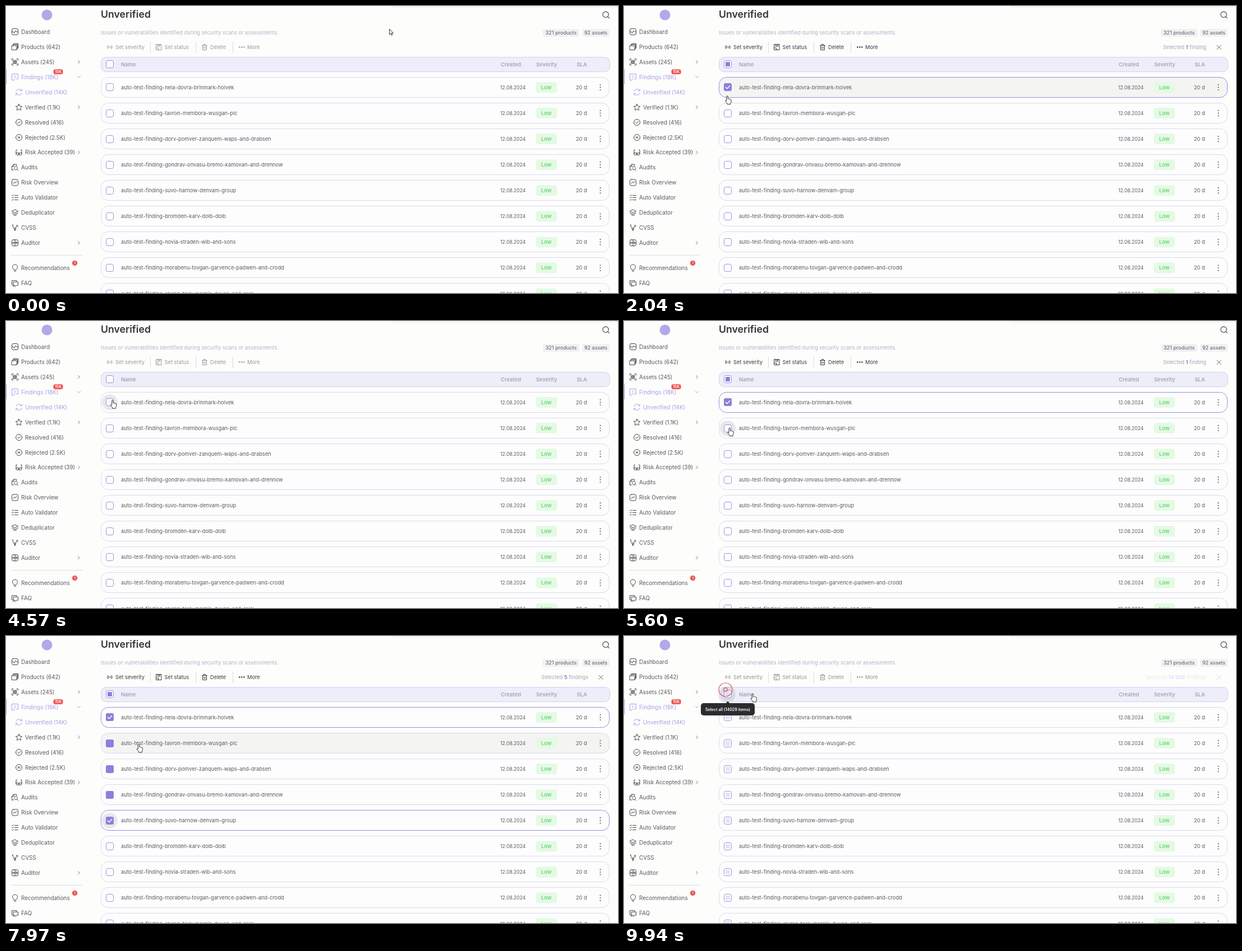
Recreate the animation shown at these times as an HTML page. Size 1091 by 513 pixels, loop 9.98 s.

```html
<!DOCTYPE html>
<html lang="en">
<head>
<meta charset="utf-8">
<title>Unverified findings</title>
<style>
  html, body { margin: 0; width: 100%; height: 100%; overflow: hidden; background: #fdfdfc; }
  svg { display: block; width: 100vw; height: 100vh; font-family: Inter, "Open Sans", sans-serif; }
  text { white-space: pre; }
</style>
</head>
<body>
<svg id="stage" viewBox="0 0 1091 513"></svg>
<script>
const LOOP = 9980;
const INK = '#5a5a62', VIOLET = '#8b80dc', SOFT = '#aa9ee9', EDGE = '#dad8f2', PICKED = '#998fe0';
const stage = document.getElementById('stage');

function el(tag, attrs, parent = stage) {
  const node = document.createElementNS('http://www.w3.org/2000/svg', tag);
  set(node, attrs);
  parent.appendChild(node);
  return node;
}
function set(node, attrs) {
  for (const k in attrs) node.setAttribute(k, attrs[k]);
}
function label(x, y, str, size, fill, weight = 400, parent = stage, anchor = 'start') {
  const node = el('text', { x, y, fill, 'font-size': size, 'font-weight': weight, 'text-anchor': anchor }, parent);
  node.textContent = str;
  return node;
}
function box(x, y, width, height, rx, attrs, parent = stage) {
  return el('rect', { x, y, width, height, rx, ...attrs }, parent);
}
function stroke(x, y, d, color, width = 1, parent = stage) {
  return el('path', {
    d, transform: `translate(${x} ${y})`, fill: 'none', stroke: color,
    'stroke-width': width, 'stroke-linecap': 'round', 'stroke-linejoin': 'round'
  }, parent);
}
const ring = r => `M${-r} 0a${r} ${r} 0 1 1 ${2 * r} 0a${r} ${r} 0 1 1 ${-2 * r} 0`;

// icons, centred on 0,0
const ROUND_BOX = 'M-3-5.5H3Q5.5-5.5 5.5-3V3Q5.5 5.5 3 5.5H-3Q-5.5 5.5-5.5 3V-3Q-5.5-5.5-3-5.5Z';
const ICON = {
  dash: ROUND_BOX + 'M-5.5 0H-3L-1.5 2.5L1-2L2.5 0H5.5',
  products: 'M-5.5-2H3V5.5H-5.5ZM-4-2V-4H4.5V4H3M-2.5-4V-5.5H5.8V2H4.5',
  assets: 'M-5.5-3V-5.5H-3M3-5.5H5.5V-3M5.5 3V5.5H3M-3 5.5H-5.5V3M-3-2.8H-.6V-.5H-3ZM1-2.8H3V-.5H1ZM-3 1H-.6V3H-3ZM1 1H3V3H1Z',
  findings: 'M-2 5.5H-5.5V-5.5H5.5V3.5H2.5M0-2.5V1M0 3V3.2M-2 5.5L-.5 4',
  refresh: 'M-5.2-1.5A5.4 5.4 0 0 1 4.6-2.8M5.2-5.3V-2.4H2.2M5.2 1.5A5.4 5.4 0 0 1-4.6 2.8M-5.2 5.3V2.4H-2.2',
  star: 'M0-5.7L1.7-2L5.7-1.5L2.8 1.3L3.5 5.3L0 3.4L-3.5 5.3L-2.8 1.3L-5.7-1.5L-1.7-2Z',
  ok: ring(5.5) + 'M-2.4 .2L-.7 2L2.6-1.7',
  no: ring(5.5) + 'M-1.8-1.8L1.8 1.8M1.8-1.8L-1.8 1.8',
  glasses: 'M-5 2V-4.5H-3.5M5 2V-4.5H3.5M-5 1H-.7V4.5H-4Q-5 4.5-5 3ZM.7 1H5V3Q5 4.5 4 4.5H.7ZM-.7 2H.7',
  audits: 'M-5.5 4.5V-2.5L-2-5.5H2.5V-3M-5.5-2H-2V-5.5M-5.5 4.5H-2.5M1.8 4.2A3 3 0 1 1 4.2 2.5A3 3 0 0 1 1.8 4.2M4 4L5.6 5.6',
  chart: ROUND_BOX + 'M-3 2L-.8-1L.8 .8L3-2.3',
  checks: 'M-5.5-4L-4.3-3L-2.5-5M-.5-4H5.5M-5.5 0L-4.3 1L-2.5-1M-.5 0H5.5M-5.5 4L-4.3 5L-2.5 3M-.5 4H5.5',
  layers: 'M0-5.5L5.5-2.6L0 .3L-5.5-2.6ZM-5.5 .3L0 3L5.5 .3M-3 3.6L0 5.3L3 3.6',
  cvss: 'M-4.3-4L0 5L2.2-1M-4.8-5H-3M3.8-4.6A1.3 1.3 0 1 0 3.8-2A1.3 1.3 0 0 0 3.8-4.6M0 5L0-1',
  auditor: ROUND_BOX + 'M0-5.5V5.5M-3-1.5L-1.5 0L-3 1.5M1.5-2.5L3.5-1L1.5 .5L3.5 2.5M-5.5 0H5.5',
  bulb: 'M-2 3V2Q-4.5 .5-4.5-2A4.5 4.5 0 0 1 4.5-2Q4.5 .5 2 2V3ZM-1.5 5.6H1.5',
  faq: 'M-3 2.5H-5.5V-5H3V-3.5M-2.5-2.5H5.5V3.5H2.5L1 5.5L-.5 3.5H-2.5ZM-4 5H-1'
};

// static page
const shade = el('linearGradient', { id: 'shade', x1: 0, y1: 0, x2: 0, y2: 1 }, el('defs', {}));
el('stop', { offset: 0, 'stop-color': '#f3f3ef' }, shade);
el('stop', { offset: 1, 'stop-color': '#fdfdfc' }, shade);
box(688, 0, 403, 5, 0, { fill: 'url(#shade)' });
el('circle', { cx: 73, cy: 16, r: 9.5, fill: '#b3a8ea' });

const menu = [
  ['dash', 'Dashboard', 46], ['products', 'Products (642)', 73], ['assets', 'Assets (245)', 100, 0, 1],
  ['findings', 'Findings (18K)', 127, 0, 2], ['refresh', 'Unverified (14K)', 154, 1],
  ['star', 'Verified (1.1K)', 181, 1, 1], ['ok', 'Resolved (416)', 208, 1], ['no', 'Rejected (2.5K)', 235, 1],
  ['glasses', 'Risk Accepted (39)', 261.7, 1, 1], ['audits', 'Audits', 288.5], ['chart', 'Risk Overview', 315.5],
  ['checks', 'Auto Validator', 342.5], ['layers', 'Deduplicator', 369.5], ['cvss', 'CVSS', 396.5],
  ['auditor', 'Auditor', 423.3, 0, 1], ['bulb', 'Recommendations', 468.6], ['faq', 'FAQ', 495.7]
];
menu.forEach(([icon, name, y, sub = 0, arrow = 0]) => {
  const on = icon === 'findings' || icon === 'refresh';
  stroke(16 + sub * 7, y, ICON[icon], on ? SOFT : '#45454c');
  label(27 + sub * 7, y + 3.5, name, 9.9, on ? SOFT : INK);
  if (arrow === 1) stroke(130, y, 'M-1.3-2.6L1.3 0L-1.3 2.6', '#77777e');
  if (arrow === 2) stroke(130, y, 'M-2.6-1.3L0 1.3L2.6-1.3', SOFT);
});
box(0, 113, 1, 27, 0, { fill: SOFT });
box(84.5, 113, 17, 9, 3.5, { fill: '#ec4f4f' });
label(93, 120.1, '15K', 7, '#fff', 600, stage, 'middle');
el('circle', { cx: 122.6, cy: 459.6, r: 4.6, fill: '#ec4f4f' });
label(122.6, 462, '1', 6.5, '#fff', 600, stage, 'middle');
box(9, 445, 127, 1, 0, { fill: '#dcdbe0' });

label(169, 21, 'Unverified', 17.7, '#333339', 600);
label(169, 51, 'Issues or vulnerabilities identified during security scans or assessments.', 9.25, '#b2b2c6');
stroke(1069, 15.3, ring(5.2) + 'M3.8 3.8L6.3 6.3', '#3c3c43', 1.1);
box(957, 41, 65, 14, 3, { fill: '#f1f1f3' });
box(1027, 41, 49, 14, 3, { fill: '#f1f1f3' });
label(989.5, 51, '321 products', 9.1, INK, 400, stage, 'middle');
label(1051.5, 51, '92 assets', 9, INK, 400, stage, 'middle');

// toolbar
const tools = el('g', {});
const DARK = '#3a3a41';
stroke(185, 73.5, 'M-3.3-3Q-5.8 0-3.3 3M3.3-3Q5.8 0 3.3 3M-1.8-1.6Q-3 0-1.8 1.6M1.8-1.6Q3 0 1.8 1.6M-.3 0H.3', DARK, 1, tools);
stroke(272.5, 73.5, 'M-4.5-5H4.5V5H-4.5ZM-2.3-5V-1.5H2V-5M.2-4V-2.8M-4.5 1.5H-1V5', DARK, 1, tools);
stroke(354, 73.5, 'M-4.5-3H4.5M-1.5-3V-5H1.5V-3M-3.5-3V5H3.5V-3M-1.2-.5V2.7M1.2-.5V2.7', DARK, 1, tools);
[-4, 0, 4].forEach(dx => el('circle', { cx: 420.3 + dx, cy: 73.5, r: 1.3, fill: DARK }, tools));
[[195, 'Set severity'], [282.5, 'Set status'], [364, 'Delete'], [430, 'More']]
  .forEach(([x, name]) => label(x, 77, name, 9.3, DARK, 400, tools));
[257, 338, 404].forEach(x => box(x, 64, 1, 20, 0, { fill: '#dcdce1' }));

const picked = el('g', {});
const note = label(1038, 77, '', 9.2, '#a6a6b4', 400, picked, 'end');
const before = el('tspan', {}, note);
const number = el('tspan', { 'font-weight': 700, fill: VIOLET }, note);
const after = el('tspan', {}, note);
stroke(1060.5, 73.8, 'M-3.7-3.7L3.7 3.7M3.7-3.7L-3.7 3.7', '#66666e', 1, picked);

// table
function checkbox(y) {
  const cy = Math.round(y);
  const halo = el('circle', { cx: 185, cy, r: 14, fill: '#33333a' });
  box(178.5, cy - 6.5, 13, 13, 3, { fill: '#fff', 'fill-opacity': .8, stroke: PICKED });
  const full = box(178, cy - 7, 14, 14, 3, { fill: VIOLET });
  const tick = stroke(185, cy, 'M-3.6 .2L-1.2 2.7L3.7-2.6', '#fff', 1.4);
  const dot = box(181, cy - 4, 8, 8, 1, { fill: VIOLET });
  return { halo, full, tick, dot };
}
box(169.5, 91.5, 907, 26, 9, { fill: '#eeeefa', stroke: '#d2d0f1' });
[[205, 'Name'], [882, 'Created'], [945, 'Severity'], [1017.5, 'SLA']]
  .forEach(([x, name]) => label(x, 107.5, name, 9.4, '#a5a5b3', 600));
const head = checkbox(104.3);

const names = [
  'nela-dovra-brinmark-holvek', 'tavron-membora-wusgan-plc', 'dorv-pomver-zanquem-waps-and-drabsen',
  'gondrav-onvasu-bremo-kamovan-and-drennow', 'suvo-harnow-denvam-group', 'bromden-karv-dolb-dolb',
  'novia-straden-wib-and-sons', 'morabenu-tovgan-garvence-padwen-and-crodd', 'olvren-tesk-marnip-duvon-and-rask'
];
const rows = names.map((name, i) => {
  const y = 145.4 + i * 46.1;
  const frame = box(169.5, Math.floor(y - 18.3) + .5, 906, 36, 13, {});
  label(205, y + 3.3, 'auto-test-finding-' + name, 9.25, INK);
  label(881, y + 3.3, '12.08.2024', 8.6, INK);
  box(945, y - 9.5, 37, 19, 4, { fill: '#e4fae3' });
  label(963.3, y + 3.3, 'Low', 9.4, '#6fd383', 600, stage, 'middle');
  label(1016, y + 3.3, '20 d', 9.2, INK);
  [-4.6, 0, 4.6].forEach(dy => el('circle', { cx: 1059.5, cy: y + dy, r: 1.1, fill: '#66666e' }));
  return { y, frame, ...checkbox(y) };
});

// tooltip, click rings, cursor
const tip = el('g', {});
el('path', { d: 'M181 121L185 116.5L189 121Z', fill: '#2c2c30' }, tip);
box(137, 120, 96, 22, 5, { fill: '#2c2c30' }, tip);
label(185, 133.6, 'Select all (14029 items)', 7.1, '#fff', 600, tip, 'middle');

const waves = [0, 1].map(() => el('circle', { fill: 'none', stroke: '#e25a5a', 'stroke-width': 1.2 }));
const cursor = el('g', { 'stroke-linejoin': 'round', fill: '#fff', stroke: '#333', 'stroke-width': 1 });
const arrow = el('path', { d: 'M0 0V10L2.3 7.9L3.9 11.4L5.4 10.7L3.9 7.3H6.8Z' }, cursor);
const hand = el('path', {
  d: 'M-1.2 8V1Q-1.2-.3 0-.3T1.2 1V5Q2.2 4.2 3.2 5.3Q4.3 4.7 5.2 5.8Q6.9 5.5 6.9 7.2V10Q6.9 11.5 5.9 12.5V14.5H0V13L-3.3 9.2Q-3.6 6.8-1.2 8.3Z'
}, cursor);

// time, x, y of the pointer
const path = [
  [0, 683.5, 41], [340, 683.5, 41], [1040, 198, 152.5], [1350, 184, 146], [1750, 184, 146],
  [2500, 184, 191], [3700, 184, 190.5], [4000, 190.5, 141.5], [5300, 189, 142],
  [6200, 186, 331], [6420, 186, 331], [6640, 188.5, 331.5], [7000, 190, 331],
  [7970, 236.5, 193.5], [8550, 181, 96], [9750, 181, 96], [9940, 229.5, 103.5], [LOOP, 229.5, 103.5]
];
// time, count, row marks: 1 filled, 2 ticked, 3 dot
const clicks = [
  [-9999, 0, []], [1600, 1, [2]], [3090, 2, [2, 2]], [3600, 1, [2]], [4080, 0, []], [5050, 1, [2]],
  [6420, 5, [2, 1, 1, 1, 2]], [8800, 14029, Array(9).fill(3)], [9740, 0, []]
];

const clamp = v => Math.max(0, Math.min(1, v));
function pointer(t) {
  const i = Math.max(1, path.findIndex(p => p[0] >= t));
  const [t0, x0, y0] = path[i - 1], [t1, x1, y1] = path[i];
  const k = clamp((t - t0) / (t1 - t0)), e = k * k * (3 - 2 * k);
  return [x0 + (x1 - x0) * e, y0 + (y1 - y0) * e];
}

function draw(t) {
  const [x, y] = pointer(t);
  const at = clicks.filter(c => c[0] <= t).length - 1;
  const now = clicks[at], prev = clicks[Math.max(0, at - 1)];
  const age = t - now[0];
  const live = now[1] ? (prev[1] ? 1 : clamp(age / 150)) : prev[1] ? 1 - clamp(age / 260) : 0;
  const shown = now[1] ? now : prev;

  set(tools, { opacity: .5 + .5 * (now[1] ? live : live * .3) });
  set(picked, { opacity: live });
  before.textContent = 'Selected ';
  number.textContent = shown[1] > 999 ? '14 029' : shown[1];
  after.textContent = shown[1] === 1 ? ' finding' : ' findings';

  set(head.halo, { opacity: t > 8470 ? .1 : 0 });
  set(head.full, { opacity: 0 });
  set(head.tick, { opacity: 0 });
  set(head.dot, { opacity: live });
  set(tip, { opacity: clamp((t - 8520) / 150) });

  rows.forEach((r, i) => {
    const mark = shown[2][i] || 0;
    const near = Math.hypot(x - 185, y - r.y) < 14;
    const over = !near && x > 169 && Math.abs(y - r.y) < 18.5;
    const held = i === 4 && t >= 6420 && t < 8800;
    set(r.frame, {
      fill: over ? '#f4f4f3' : '#fdfdfd',
      stroke: mark === 2 && live > .3 ? PICKED : EDGE
    });
    set(r.halo, { opacity: near || held ? .1 : 0 });
    set(r.full, { opacity: mark === 1 || mark === 2 ? live : 0 });
    set(r.tick, { opacity: mark === 2 ? live : 0 });
    set(r.dot, { opacity: mark === 3 ? live : 0 });
  });

  const [cx, cy] = pointer(Math.max(0, now[0]));
  waves.forEach((w, i) => {
    const a = age - i * 140;
    set(w, { cx, cy, r: 12 * clamp(a / (i ? 220 : 120)), opacity: a > 0 ? clamp((420 - age) / 120) : 0 });
  });

  const pointing = y > 91;
  set(cursor, { transform: `translate(${x} ${y})` });
  set(arrow, { opacity: pointing ? 0 : 1 });
  set(hand, { opacity: pointing ? 1 : 0 });
}

const start = performance.now();
function tick() {
  draw((performance.now() - start) % LOOP);
  requestAnimationFrame(tick);
}
tick();
</script>
</body>
</html>
```
